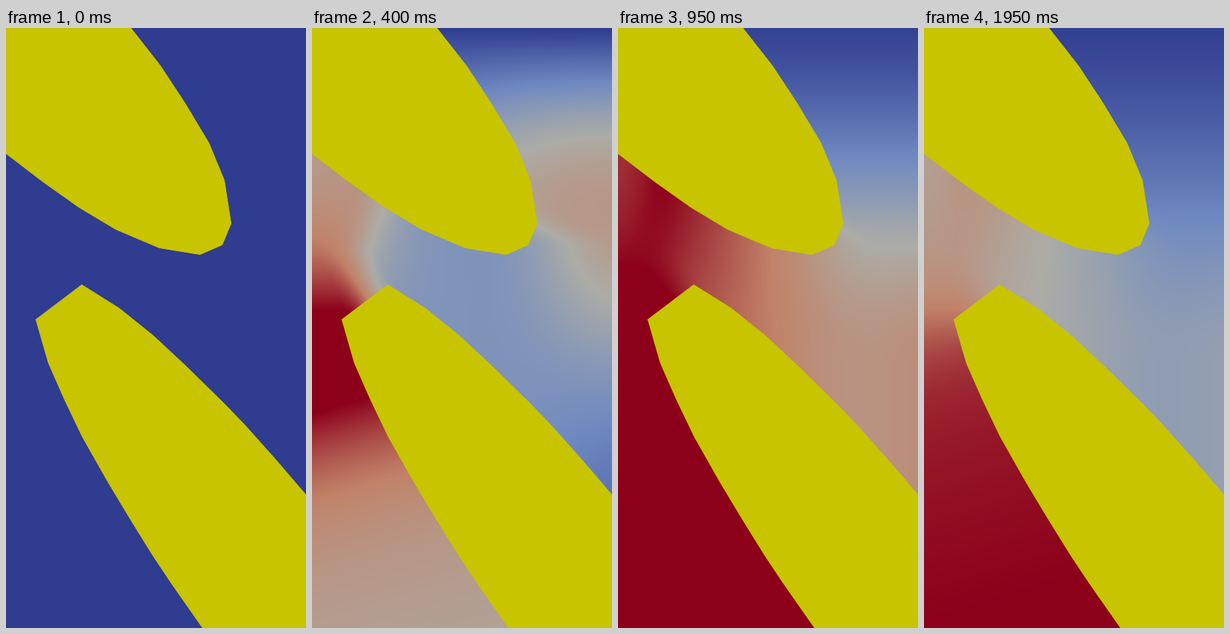
These frames come from a looping animation (406x812 px, 2 s). An HTML page with a canvas:

```html
<!DOCTYPE html>
<html lang="en">
<head>
<meta charset="utf-8">
<title>Heat field</title>
<style>
html, body { margin: 0; width: 100%; height: 100%; overflow: hidden; background: #2f3c8f; }
canvas { display: block; width: 100vw; height: 100vh; }
</style>
</head>
<body>
<canvas id="stage" width="406" height="812"></canvas>
<script>
const W = 406, H = 812, LOOP = 2000, STEP = 50;
const ctx = document.getElementById('stage').getContext('2d');
const image = ctx.createImageData(W, H);

const mix = (a, b, p) => a + (b - a) * p;
const bump = (x, width) => 1 / (1 + (x / width) ** 2);
function smooth(a, b, x) {
  const p = Math.min(1, Math.max(0, (x - a) / (b - a)));
  return p * p * (3 - 2 * p);
}

// Colour scale, cold to hot
const stops = [0, .28, .5, .72, 1];
const tints = [[47, 60, 143], [110, 137, 193], [172, 172, 166], [193, 130, 104], [140, 0, 26]];
const SHADES = 1023;
const palette = new Uint8ClampedArray((SHADES + 1) * 3);
for (let i = 0, k = 0; i <= SHADES; i++) {
  const v = i / SHADES;
  if (v > stops[k + 1]) k++;
  const p = (v - stops[k]) / (stops[k + 1] - stops[k]);
  for (let c = 0; c < 3; c++) palette[i * 3 + c] = mix(tints[k][c], tints[k + 1][c], p);
}

// Two sources heat the field, then the heat spreads out and decays
function phases(t) {
  const e = t / 400;
  return {
    heat: e,
    spread: e * Math.min(e, 1),
    reach: 270 * Math.sqrt(e) + 1,
    cool: Math.exp((1950 - t) / 2200),
    turn: smooth(400, 850, t)
  };
}

// Heat down the left side, through the gap and down the right side
function leftSide(u, s) {
  const early = .5 * s.heat * s.spread + .65 * s.heat * bump(u - 445, u < 445 ? 115 : 140);
  const late = .765 + .15 * Math.tanh((u - 400) / 80) + .00021 * (u - 400);
  return mix(early, late * s.cool, s.turn);
}
function gap(x, s) {
  const early = s.heat * Math.min(s.heat, 1) * (.34 + .3 * Math.exp(-((x / 90) ** 2)));
  return mix(early, (.66 - .00098 * x) * s.cool, s.turn);
}
function rightEarly(y, s) {
  const rise = Math.sin(Math.PI / 2 * Math.min(1, y / 240));
  return (1 - s.turn) * .61 * s.heat * rise * bump(Math.max(0, y - 240), s.reach);
}
function rightLate(y, s) {
  return s.turn * .42 * smooth(-60, 460, y) * s.cool;
}
const sample = (f, s) => Float32Array.from({ length: 960 }, (_, i) => f(i, s));

// Where each pixel reads the profiles, and how they blend
const map = () => new Float32Array(W * H);
const leftPos = map(), gapPos = map(), leave = map(), arrive = map();
for (let y = 0, i = 0; y < H; y++) {
  for (let x = 0; x < W; x++, i++) {
    const lean = Math.min(90, Math.max(-90, y - 310));
    leftPos[i] = y + .3 * x * smooth(380, 450, y);
    gapPos[i] = Math.max(0, x + (200 - x) * .0037 * lean);
    leave[i] = smooth(0, 90, x - .5 * Math.max(0, y - 300));
    arrive[i] = smooth(230, 420, x + 2 * Math.max(0, 290 - y));
  }
}
const sideways = Float32Array.from({ length: W }, (_, x) => bump(400 - x, 400));

function read(list, p) {
  const i = p | 0;
  return mix(list[i], list[i + 1], p - i);
}

function paintHeat(t) {
  const s = phases(t), px = image.data;
  const left = sample(leftSide, s), mid = sample(gap, s);
  const early = sample(rightEarly, s), late = sample(rightLate, s);
  for (let y = 0, i = 0; y < H; y++) {
    for (let x = 0; x < W; x++, i++) {
      const right = early[y] * sideways[x] + late[y];
      const flow = mix(read(mid, gapPos[i]), right, arrive[i]);
      const v = mix(read(left, leftPos[i]), flow, leave[i]);
      const k = Math.round(Math.min(1, Math.max(0, v)) * SHADES) * 3, o = i * 4;
      px[o] = palette[k];
      px[o + 1] = palette[k + 1];
      px[o + 2] = palette[k + 2];
      px[o + 3] = 255;
    }
  }
  ctx.putImageData(image, 0, 0);
}

function polygon(points) {
  const path = new Path2D();
  points.forEach(([x, y]) => path.lineTo(x + .5, y + .5));
  path.closePath();
  return path;
}
const solids = [
  polygon([[-1, -1], [168, -1], [208, 50], [241, 100], [274, 155], [295, 206], [304, 264],
    [292, 293], [262, 306], [207, 297], [148, 272], [98, 242], [50, 208], [-1, 169]]),
  polygon([[102, 347], [153, 379], [199, 416], [243, 457], [295, 508], [322, 536],
    [364, 583], [406, 632], [406, 812], [266, 812], [224, 752], [198, 713], [167, 663],
    [137, 613], [103, 553], [79, 503], [57, 453], [40, 394]])
];
ctx.fillStyle = ctx.strokeStyle = '#c8c400';
ctx.lineJoin = 'round';

let shown = -1;
const start = performance.now();
function tick() {
  const t = Math.floor((performance.now() - start) % LOOP / STEP) * STEP;
  if (t !== shown) {
    shown = t;
    paintHeat(t);
    solids.forEach(path => {
      ctx.fill(path);
      ctx.stroke(path);
    });
  }
  requestAnimationFrame(tick);
}
tick();
</script>
</body>
</html>
```
